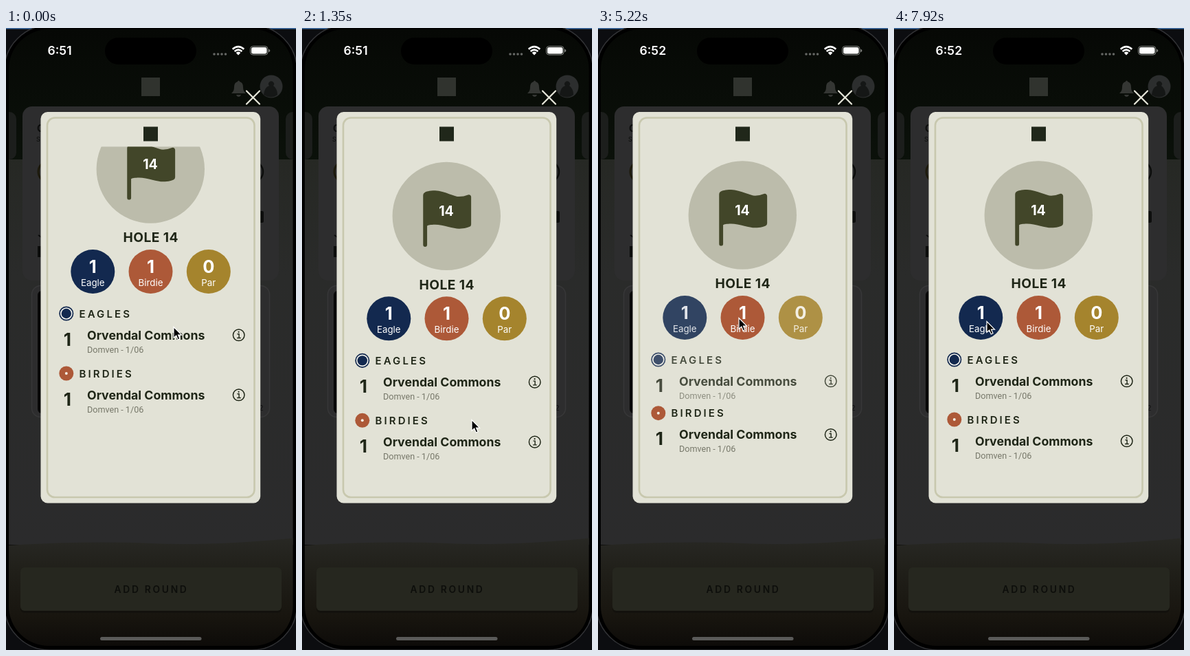
Recreate the animation shown at these times as an HTML page. Size 422 px wide and 904 px high, loop 7950 ms.

```html
<!DOCTYPE html>
<html lang="en">
<head>
<meta charset="utf-8">
<title>Hole summary</title>
<style>
  html, body { margin: 0; width: 100%; height: 100%; overflow: hidden; background: #000; }
  svg { display: block; width: 100%; height: 100%; }
  text { font-family: Inter, "Open Sans", sans-serif; }
  .mid { text-anchor: middle; }
  .bold { font-weight: 700; }
  .sub { font-family: Roboto, sans-serif; font-size: 12.6px; fill: #77786a; }
  .head { font-size: 15px; font-weight: 600; letter-spacing: 3.1px; }
</style>
</head>
<body>
<svg viewBox="0 0 422 904" preserveAspectRatio="none">
  <defs>
    <linearGradient id="sky" x2="0" y2="1">
      <stop offset="0" stop-color="#060805"/><stop offset="1" stop-color="#0b110a"/>
    </linearGradient>
    <linearGradient id="page" x2="0" y2="1">
      <stop offset="0" stop-color="#262824"/><stop offset=".3" stop-color="#2a2b2a"/>
      <stop offset="1" stop-color="#2b2b2c"/>
    </linearGradient>
    <linearGradient id="ground" x2="0" y2="1">
      <stop offset="0" stop-color="#282824"/><stop offset=".3" stop-color="#201f19"/>
      <stop offset=".7" stop-color="#18150f"/><stop offset="1" stop-color="#0c0a08"/>
    </linearGradient>
    <clipPath id="screen"><rect x="4" y="2" width="413.5" height="896" rx="58"/></clipPath>
    <clipPath id="view"><rect x="52" y="172.5" width="317" height="497"/></clipPath>
  </defs>

  <rect width="422" height="904" fill="#0c0d10"/>
  <rect width="422" height="1.5" fill="#3f6ea5"/>
  <rect x="-2.5" y="-4" width="426" height="908" rx="66" fill="#000" stroke="#323336" stroke-width="1.5"/>

  <g clip-path="url(#screen)">
    <rect width="422" height="192" fill="url(#sky)"/>
    <rect y="191" width="422" height="560" fill="url(#page)"/>
    <path d="M0 752Q120 745 210 749T422 741V904H0Z" fill="url(#ground)"/>
    <rect x="-20" y="122" width="35" height="69" rx="10" fill="#1c1e1c"/>
    <rect x="407" y="122" width="30" height="69" rx="10" fill="#1c1e1c"/>
    <rect x="24" y="114" width="373" height="253" rx="14" fill="#2d2d2e"/>
    <g fill="#0c0d0c">
      <text x="45" y="151" font-size="14" class="bold">O</text>
      <text x="44" y="165" font-size="9">S</text>
      <rect x="46" y="317" width="9" height="16"/>
      <rect x="366" y="266" width="9" height="17" rx="2"/>
      <path d="M47 301l6 4" stroke="#0c0d0c" stroke-width="2"/>
    </g>
    <circle cx="62" cy="209" r="15" fill="none" stroke="#1d1a0c" stroke-width="3"/>
    <circle cx="359" cy="209" r="15" fill="none" stroke="#0b0c0b" stroke-width="2.5"/>
    <rect x="37.5" y="374.5" width="346" height="191" rx="13" fill="#2d2d2e" stroke="#373738" stroke-width="1.5"/>
    <rect x="46" y="382" width="30" height="178" rx="6" fill="#070707"/>
    <text x="368" y="556" font-size="11" fill="#111">2</text>

    <rect x="197" y="72" width="27" height="27" fill="#30332e"/>
    <path d="M328 95q4-3 4-9 0-7 5-8a1.5 1.5 0 0 1 3 0q5 1 5 8 0 6 4 9ZM335 97h7q-1 3-3.5 3t-3.5-3Z" fill="#343633"/>
    <circle cx="386" cy="85" r="16.5" fill="#2c2e2e"/>
    <path d="M375 97q1-11 8-13a4 4 0 1 1 6 0q6 4 6 13Q386 104 375 97Z" fill="#151716"/>

    <rect x="21" y="786" width="380" height="64" rx="6" fill="#0a0a08" opacity=".4"/>
    <rect x="21" y="784" width="380" height="63" rx="6" fill="#26271f"/>
    <text x="211.5" y="821" class="mid" font-size="13.8" font-weight="600" letter-spacing="2.7" fill="#0d0e0b">ADD ROUND</text>
    <rect x="137" y="885" width="147.5" height="5" rx="2.5" fill="#5a5a59"/>
  </g>

  <rect x="144" y="14" width="133" height="39" rx="19.5" fill="#000"/>
  <text id="clock" x="60.5" y="39" font-size="17.6" font-weight="600" fill="#fff"></text>
  <g fill="#666865">
    <circle cx="303" cy="38" r="1.8"/><circle cx="308.5" cy="38" r="1.8"/>
    <circle cx="314" cy="38" r="1.8"/><circle cx="319.5" cy="38" r="1.8"/>
  </g>
  <path d="M329.7 30.8Q338 23.5 346.3 30.8M332.6 34Q338 29.3 343.4 34" fill="none" stroke="#fff" stroke-width="2.5"/>
  <path d="M334.7 36q3.3-2.8 6.6 0L338 39.5Z" fill="#fff"/>
  <rect x="355.5" y="26.5" width="25.5" height="12.5" rx="4" fill="none" stroke="#878986"/>
  <rect x="357" y="28" width="22.5" height="9.5" rx="2.7" fill="#fff"/>
  <path d="M382.3 30.8q2 .6 2 2.2t-2 2.2Z" fill="#878986"/>

  <rect x="50.5" y="122" width="319.7" height="568.5" rx="10" fill="#e2e2d6"/>
  <rect x="60" y="130.5" width="301.5" height="551.5" rx="11" fill="none" stroke="#c8c8ae" stroke-width="2.6"/>
  <rect x="200" y="143.5" width="21" height="21" fill="#20271a"/>
  <path d="M350 91.5l19 19m0-19l-19 19" stroke="#e8e8dc" stroke-width="2.2" stroke-linecap="round"/>

  <g clip-path="url(#view)">
    <g id="content" fill="#1f2617">
      <circle cx="210.3" cy="272" r="78.7" fill="#bcbcab"/>
      <path fill="#424629" transform="translate(164.6 229.2) scale(.182)" d="M80 480a16 16 0 0 1-16-16V68a24 24 0 0 1 12-20.700C88 40.400 112.400 32 160 32c37.200 0 78.800 14.700 115.500 27.700C305 70 333 80 352 80a184 184 0 0 0 71-14.500 18 18 0 0 1 25 16.600v219.400a20 20 0 0 1-12 18.300C427.300 323.600 395.500 336 352 336c-24 0-54.400-7-86.400-14.700C229.600 312.800 192.400 304 160 304c-36.900 0-55.700 5.600-64 9V464a16 16 0 0 1-16 16Z"/>
      <text x="210" y="272" class="mid bold" font-size="19.5" fill="#fff">14</text>
      <text x="210.7" y="378.3" class="mid bold" font-size="19.2" letter-spacing=".4">HOLE 14</text>
      <g id="stats"></g>
      <g id="sections"></g>
    </g>
  </g>

  <g id="cursor">
    <g id="ring" fill="none">
      <circle r="22.3" stroke="#f4f4ee"/>
      <circle r="21.3" stroke="#111" stroke-width="1.3"/>
    </g>
    <path d="M0-.5V15.5l3.7-3.4 2.6 5.9 2.7-1.2-2.5-5.7h5Z" fill="#000" stroke="#fff" stroke-width="1.2"/>
  </g>
</svg>
<script>
const $ = id => document.getElementById(id);
const LOOP = 7950, FADE = 480, ROW = 87;
const NAVY = '#13294f', RUST = '#ad5938', GOLD = '#a5842d';

const stat = (x, color, count, label) => `<g>
  <circle cx="${x}" cy="421" r="32" fill="${color}"/>
  <g fill="#fff" class="mid">
    <text x="${x}" y="422.5" class="bold" font-size="25.5">${count}</text>
    <text x="${x}" y="442" font-size="13.3">${label}</text>
  </g></g>`;

const section = (icon, title) => `<g>${icon}
  <text x="106.5" y="487.8" class="head">${title}</text>
  <text x="89.3" y="528.5" class="mid bold" font-size="26">1</text>
  <text x="118" y="519.5" class="bold" font-size="17.7">Orvendal Commons</text>
  <text x="118" y="538.8" class="sub">Domven - 1/06</text>
  <circle cx="338.7" cy="513.3" r="8.3" fill="none" stroke="#1f2617" stroke-width="1.5"/>
  <path d="M336.5 511.8h2.6v5.7m-3 0h5.6" fill="none" stroke="#1f2617" stroke-width="1.4"/>
  <circle cx="338.6" cy="508.8" r="1.1"/></g>`;

const eagleIcon = `<circle cx="87.8" cy="482" r="9.7" fill="#f4f4ee" stroke="${NAVY}" stroke-width="1.7"/>
  <circle cx="87.8" cy="482" r="7.2" fill="${NAVY}"/>`;
const birdieIcon = `<circle cx="87.8" cy="482" r="10.5" fill="${RUST}"/>
  <circle cx="87.8" cy="482" r="2" fill="#f4efe4"/>`;

$('stats').innerHTML = stat(126.3, NAVY, 1, 'Eagle') + stat(210.5, RUST, 1, 'Birdie') + stat(294.8, GOLD, 0, 'Par');
$('sections').innerHTML = section(eagleIcon, 'EAGLES') + section(birdieIcon, 'BIRDIES');
const stats = [...$('stats').children];
const [eagles, birdies] = $('sections').children;

// Filter switches: [start, direction]
const eagleFilter = [[2240, 1], [3035, -1], [7050, 1], [7430, -1]];
const birdieFilter = [[3960, 1], [4885, -1], [5635, 1], [7050, -1]];
const lift = [[3960, 1], [4843, -1], [5635, 1], [7050, -1]];
const taps = [2240, 3035, 3960, 4843, 5635, 7050, 7430];

// Pointer stops: [time, x, y]
const path = [
  [0, 244, 435], [430, 244, 435], [840, 243.3, 588], [930, 243.3, 588], [1350, 247, 570],
  [1680, 199, 460], [2100, 135, 427], [3560, 135, 427], [3890, 205, 422],
  [6450, 205, 422], [7000, 135, 427], [LOOP, 135, 427]
];

const clamp = v => Math.min(1, Math.max(0, v));
const ease = v => (1 - Math.cos(Math.PI * clamp(v))) / 2;
const level = (steps, t) => clamp(steps.reduce((sum, [at, dir]) => sum + dir * ease((t - at) / FADE), 0));

// Critically damped return after an overscroll
function settle(ms) {
  const k = Math.max(0, ms) * 0.0135;
  return (1 + k) * Math.exp(-k);
}

function rubber(d, size = 497) {
  return size * (1 - 1 / (d * 0.467 / size + 1));
}

function pointer(t) {
  const i = path.findIndex(p => p[0] > t);
  const [t0, x0, y0] = path[i - 1], [t1, x1, y1] = path[i];
  const k = ease((t - t0) / (t1 - t0));
  return [x0 + (x1 - x0) * k, y0 + (y1 - y0) * k];
}

function scroll(t, y) {
  return t < 925 ? -67 * settle(t - 50) + rubber(y - 435)
    : t < 1680 ? rubber(153) * settle(t - 925) : 0;
}

function fadeStat(el, off) {
  for (const part of el.children) part.setAttribute('opacity', 1 - 0.7 * off);
}

function draw(t) {
  const [x, y] = pointer(t);
  const e = level(eagleFilter, t), b = level(birdieFilter, t);
  const pressed = (t > 430 && t < 925) || taps.some(at => t >= at && t < at + 90);

  $('clock').textContent = t < 1890 ? '6:51' : '6:52';
  $('cursor').setAttribute('transform', `translate(${x} ${y})`);
  $('ring').setAttribute('visibility', pressed ? 'visible' : 'hidden');
  $('content').setAttribute('transform', `translate(0 ${scroll(t, y)})`);
  [b, e, clamp(e + b)].forEach((off, i) => fadeStat(stats[i], off));
  eagles.setAttribute('opacity', 1 - b);
  birdies.setAttribute('opacity', 1 - e);
  birdies.setAttribute('transform', `translate(0 ${ROW * (1 - level(lift, t))})`);
}

const start = performance.now();
function tick() {
  draw((performance.now() - start) % LOOP);
  requestAnimationFrame(tick);
}
tick();
</script>
</body>
</html>
```
